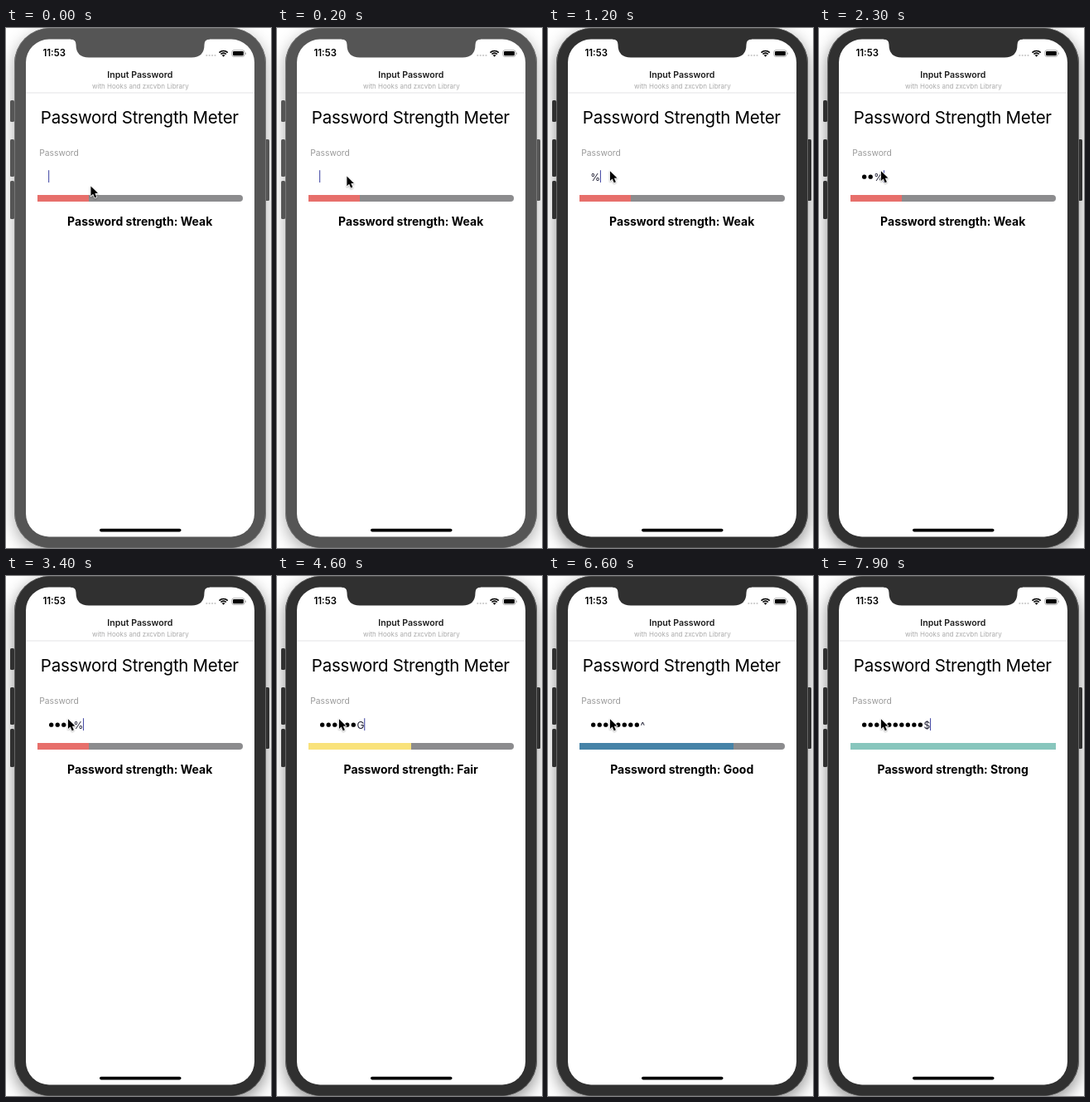
An HTML page with a canvas for the animation above (8000 ms loop, 320x626 px).

```html
<!DOCTYPE html>
<html lang="en">
<head>
<meta charset="utf-8">
<title>Password Strength Meter</title>
<style>
  html, body { margin: 0; width: 100%; height: 100%; overflow: hidden; background: #fff; }
  canvas { display: block; width: 320px; height: 626px; }
</style>
</head>
<body>
<canvas id="stage"></canvas>
<script>
const W = 320, H = 626, LOOP = 8000;
const FONT = 'Inter, Roboto, "Liberation Sans", sans-serif';
const canvas = document.getElementById('stage');
const ctx = canvas.getContext('2d');
const ratio = window.devicePixelRatio || 1;
canvas.width = W * ratio;
canvas.height = H * ratio;

// Each key press: time in ms and the character it adds
const KEYS = [
  [1100, '%'], [1700, '%'], [2300, '%'], [2800, '$'], [3400, '%'], [3900, 'G'],
  [4600, 'G'], [5200, '%'], [5800, '^'], [7200, '5'], [7700, '$']
];
const LEVELS = [
  { from: 0, name: 'Weak', part: 0.25, color: '#e76f6b' },
  { from: 4600, name: 'Fair', part: 0.5, color: '#f9e27b' },
  { from: 5800, name: 'Good', part: 0.75, color: '#4683a7' },
  { from: 7700, name: 'Strong', part: 1, color: '#88c6bd' }
];
const CLICK = 280, RELEASE = 480;

const ramp = (t, a, b) => Math.min(1, Math.max(0, (t - a) / (b - a)));
const ease = p => p * p * (3 - 2 * p);

function box(x, y, w, h, r, color) {
  ctx.beginPath();
  ctx.roundRect(x, y, w, h, r);
  ctx.fillStyle = color;
  ctx.fill();
}

function disc(x, y, r, color) {
  ctx.beginPath();
  ctx.arc(x, y, r, 0, Math.PI * 2);
  ctx.fillStyle = color;
  ctx.fill();
}

function text(str, x, y, size, { weight = 400, color = '#000', align = 'center', gap = 0 } = {}) {
  ctx.font = `${weight} ${size}px ${FONT}`;
  ctx.letterSpacing = gap + 'px';
  ctx.textAlign = align;
  ctx.fillStyle = color;
  ctx.fillText(str, x, y);
  return ctx.measureText(str).width;
}

function drawPhone(active) {
  const shell = active ? '#303030' : '#555';
  ctx.fillStyle = '#fff';
  ctx.fillRect(0, 0, W, H);

  ctx.save();
  ctx.shadowColor = active ? 'rgba(0,0,0,.45)' : 'rgba(0,0,0,.33)';
  ctx.shadowBlur = 19 * ratio;
  ctx.shadowOffsetY = 6 * ratio;
  box(10, 0, 304, 626, 43, shell);
  ctx.restore();

  for (const [x, y, h] of [[5, 87, 26], [5, 134, 45], [5, 184, 46], [313, 134, 74]])
    box(x, y, 5, h, 1.5, shell);
  box(10, 0, 304, 626, 43, active ? '#666' : '#777');
  box(11, 0.5, 302, 625, 42, shell);
  box(24, 13.5, 276, 599, 28, '#fff');

  // Notch with flared top corners
  ctx.beginPath();
  ctx.moveTo(78, 13);
  ctx.lineTo(78, 13.5);
  ctx.quadraticCurveTo(84.5, 13.5, 84.5, 20);
  ctx.quadraticCurveTo(84.5, 35.5, 100, 35.5);
  ctx.lineTo(224, 35.5);
  ctx.quadraticCurveTo(239.5, 35.5, 239.5, 20);
  ctx.quadraticCurveTo(239.5, 13.5, 246, 13.5);
  ctx.lineTo(246, 13);
  ctx.fillStyle = shell;
  ctx.fill();

  box(113, 602.8, 98.5, 3.6, 1.8, '#000');
}

function drawStatus() {
  text('11:53', 58.2, 34.3, 11.4, { weight: 600 });
  for (let i = 0; i < 4; i++) disc(242.3 + i * 3.4, 33, 1.1, '#c8c8c8');

  const cx = 262.6, cy = 34.7;
  ctx.strokeStyle = '#000';
  ctx.lineWidth = 1.7;
  for (const r of [7.2, 4.5]) {
    ctx.beginPath();
    ctx.arc(cx, cy, r, -Math.PI * 0.75, -Math.PI * 0.25);
    ctx.stroke();
  }
  ctx.beginPath();
  ctx.moveTo(cx, cy);
  ctx.arc(cx, cy, 2.6, -Math.PI * 0.75, -Math.PI * 0.25);
  ctx.fillStyle = '#000';
  ctx.fill();

  ctx.beginPath();
  ctx.roundRect(272.8, 26.8, 15.2, 7.6, 2.2);
  ctx.strokeStyle = '#999';
  ctx.lineWidth = 0.8;
  ctx.stroke();
  box(274, 28, 12.8, 5.2, 1.2, '#000');
  box(288.8, 29.4, 1, 2.4, 0.5, '#999');
}

function drawHeader() {
  text('Input Password', 161.8, 59.8, 10.6, { weight: 600, color: '#1c1c1c' });
  text('with Hooks and zxcvbn Library', 162.3, 72.8, 8, { color: '#aaa' });
  ctx.fillStyle = '#e3e3e5';
  ctx.fillRect(24, 77.5, 276, 1);
  text('Password Strength Meter', 161.3, 114.5, 20.5, { gap: -0.3 });
}

function caretAlpha(t) {
  if (t < 1100) return 1 - ramp(t, 240, 420) + ramp(t, 700, 800);
  return 1 - ramp(t, 6420, 6590) + ramp(t, 6920, 7000);
}

function drawField(t) {
  text('Password', 40.2, 154, 10.3, { color: '#9a9a9a', align: 'left' });
  const typed = KEYS.filter(([at]) => t >= at);
  let x = 51.3;
  if (typed.length) {
    for (let i = 1; i < typed.length; i++, x += 7.52) disc(x + 3.4, 179.2, 2.65, '#000');
    const last = typed[typed.length - 1][1];
    x += text(last, x, 183.6, 12, { color: '#1c1c30', align: 'left' });
  }
  ctx.globalAlpha = caretAlpha(t);
  ctx.fillStyle = '#4b4fa8';
  ctx.fillRect(x - 0.2, 171.2, 1.1, 14.8);
  ctx.globalAlpha = 1;
}

function drawMeter(t) {
  const level = LEVELS.filter(l => t >= l.from).pop();
  box(38, 201, 248, 8, 4, '#8c8c8e');
  box(38, 201, 248 * level.part, 8, 0, level.color);
  text('Password strength: ' + level.name, 161.7, 237.8, 14, { weight: 700 });
}

function drawPointer(t) {
  const p = ease(ramp(t, 80, 280));
  const x = 102 - 27.5 * p, y = 190 - 18.3 * p;
  if (t >= CLICK && t < RELEASE) {
    ctx.beginPath();
    ctx.arc(x, y + 1.3, 19.8, 0, Math.PI * 2);
    ctx.strokeStyle = '#000';
    ctx.lineWidth = 2.7;
    ctx.stroke();
  }
  ctx.save();
  ctx.translate(x, y);
  ctx.scale(0.87, 0.87);
  ctx.beginPath();
  for (const [px, py] of [[0.5, 0.5], [0.5, 14.2], [3.6, 11.3], [6, 16.6], [8.5, 15.5], [6.2, 10.3], [10.3, 10.2]])
    ctx.lineTo(px, py);
  ctx.closePath();
  ctx.lineJoin = 'round';
  ctx.strokeStyle = '#fff';
  ctx.lineWidth = 1.8;
  ctx.shadowColor = 'rgba(0,0,0,.3)';
  ctx.shadowBlur = 2 * ratio;
  ctx.shadowOffsetY = ratio;
  ctx.stroke();
  ctx.shadowColor = 'transparent';
  ctx.fillStyle = '#000';
  ctx.fill();
  ctx.restore();
}

function draw(t) {
  ctx.setTransform(ratio, 0, 0, ratio, 0, 0);
  drawPhone(t >= CLICK);
  drawStatus();
  drawHeader();
  drawField(t);
  drawMeter(t);
  drawPointer(t);
}

const start = performance.now();
function tick() {
  draw((performance.now() - start) % LOOP);
  requestAnimationFrame(tick);
}
tick();
</script>
</body>
</html>
```
